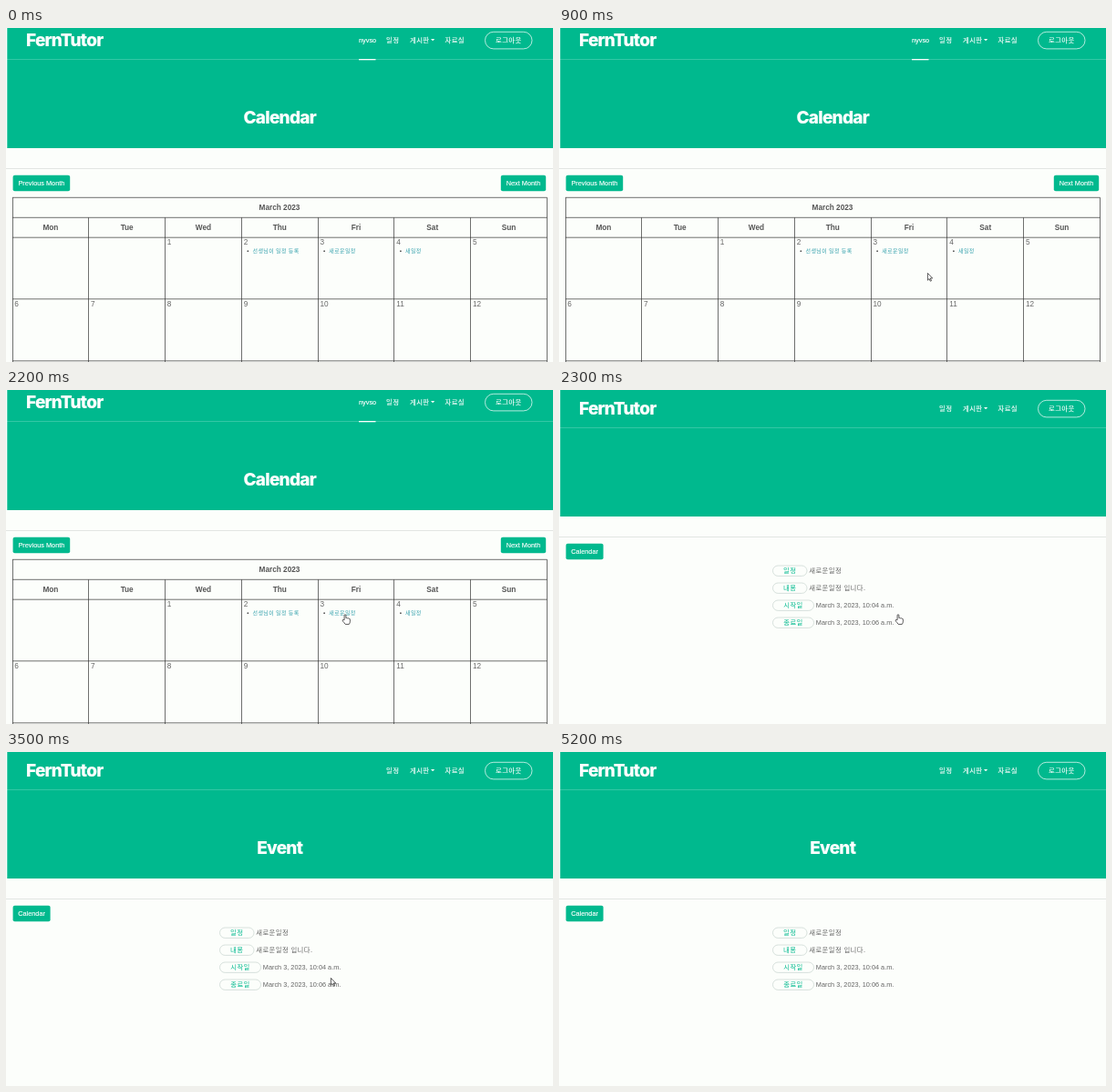
Write an HTML page that moves like this. It is 600 px wide and 367 px high and loops after 6 s.

```html
<!DOCTYPE html>
<html lang="ko">
<head>
<meta charset="utf-8">
<title>Class calendar</title>
<style>
  html, body { margin: 0; width: 100%; height: 100%; overflow: hidden; background: #fcfefb; }
  svg { display: block; width: 600px; height: 367px; }
  text { font: 7.33px "Liberation Sans", "Noto Sans CJK KR", "Noto Sans CJK", sans-serif; fill: #666; }
  .ko { font: 7.4px "Noto Sans CJK KR", "Noto Sans CJK", sans-serif; letter-spacing: .35px; }
  .link { font: 6px "Noto Sans CJK KR", "Noto Sans CJK", sans-serif; letter-spacing: .35px; fill: #38a3ae; }
  .white { fill: #fff; stroke: #fff; stroke-width: .15; }
  .big { font: 800 19px Inter, sans-serif; letter-spacing: -.75px; }
  .head { font-size: 8.25px; font-weight: 700; fill: #555; text-anchor: middle; }
  .day { font-size: 8.25px; }
  .green { fill: #00b98e; }
  .mid { text-anchor: middle; }
</style>
</head>
<body>
<svg id="stage" viewBox="0 0 600 367"></svg>
<script>
const GREEN = '#00b98e', LOOP = 6000, SWITCH = 2300, ZOOM = 1000;

const text = (x, y, s, cls = '') => `<text x="${x}" y="${y}" class="${cls}">${s}</text>`;
const rect = (x, y, w, h, fill, extra = '') =>
  `<rect x="${x}" y="${y}" width="${w}" height="${h}" fill="${fill}" ${extra}/>`;
const line = (x1, y1, x2, y2, stroke, width = 1) =>
  `<path d="M${x1} ${y1}L${x2} ${y2}" stroke="${stroke}" stroke-width="${width}"/>`;
const button = (x, y, w, label) =>
  rect(x, y, w, 17.5, GREEN, 'rx="2"') + text(x + w / 2, y + 11.3, label, 'white mid');

function header() {
  return rect(1.3, 0, 598.7, 139, GREEN) +
    line(1, 41.5, 600, 41.5, 'rgba(255,255,255,.2)') +
    line(0, 161.5, 600, 161.5, '#e2e6e3') +
    text(22, 26.8, 'FernTutor', 'big white') +
    text(417, 22.7, '일정', 'ko white') +
    text(443, 22.7, '게시판', 'ko white') +
    '<path d="M466 19h4.2l-2.1 2.2z" fill="#fff"/>' +
    text(481.5, 22.7, '자료실', 'ko white') +
    rect(525.5, 11.3, 51.5, 18.6, 'none', 'rx="9.3" stroke="#fff" stroke-width=".7"') +
    text(551.3, 22.7, '로그아웃', 'ko white mid');
}

function calendarTable() {
  const left = 7, step = 83.78, right = 593.5, ink = '#333', thin = .7;
  const col = i => left + i * step;
  let s = text(300, 200, 'March 2023', 'head');
  for (const y of [186.3, 208.3, 230.2, 297.8, 365.8]) s += line(left, y, right, y, ink, thin);
  for (let i = 0; i < 8; i++) {
    const x = Math.floor(col(i)) + .5;
    s += line(x, i % 7 ? 208.3 : 186.3, x, 367, ink, thin);
  }
  ['Mon', 'Tue', 'Wed', 'Thu', 'Fri', 'Sat', 'Sun'].forEach((d, i) =>
    s += text(col(i) + step / 2, 221.8, d, 'head'));
  for (let d = 1; d <= 12; d++) {
    const cell = d + 1;
    s += text(col(cell % 7) + 2.3, cell < 7 ? 238.4 : 305.9, d, 'day');
  }
  ['선생님이 일정 등록', '새로운일정', '새일정'].forEach((t, i) => {
    const x = col(3 + i);
    s += `<circle cx="${x + 7}" cy="245.2" r=".9" fill="#555"/>` + text(x + 12.2, 247.2, t, 'link');
  });
  return s;
}

function eventDetails() {
  const rows = [
    ['일정', '새로운일정', 37.5, 'ko'],
    ['내용', '새로운일정 입니다.', 37.5, 'ko'],
    ['시작일', 'March 3, 2023, 10:04 a.m.', 45, ''],
    ['종료일', 'March 3, 2023, 10:06 a.m.', 45, '']
  ];
  return rows.map(([label, value, w, cls], i) => {
    const y = 198.7 + 19 * i;
    return rect(234.5, y - 5.7, w, 11.4, 'none', 'rx="5.7" stroke="#cfdad5" stroke-width=".8"') +
      text(234.5 + w / 2, y + 2.7, label, 'ko green mid') +
      text(236.8 + w, y + 2.7, value, cls);
  }).join('');
}

const stage = document.getElementById('stage');
stage.innerHTML =
  `<g id="calendar">
    <g transform="translate(0 -7)">${header()}
      ${text(387, 22.6, 'nyvso', 'white')}${rect(387, 41, 18.5, 1.3, '#fff')}
      ${text(300.2, 111.8, 'Calendar', 'big white mid')}
      ${button(7.6, 168.8, 62.6, 'Previous Month')}${button(542.8, 168.8, 49.4, 'Next Month')}
    </g>${calendarTable()}
  </g>
  <g id="event">${header()}${button(7.6, 168.8, 41, 'Calendar')}${eventDetails()}
    <g id="title">${text(0, 6.8, 'Event', 'big white mid')}</g>
  </g>
  <g id="cursor" fill="#fff" stroke="#333" stroke-width=".8" stroke-linejoin="round">
    <path id="arrow" d="M.4.4V8.2L2.1 6.5 3.3 9.2 4.5 8.7 3.3 6H5.7Z"/>
    <path id="hand" d="M-.9 5.6V.8Q-.9-.3 0-.3T.9.8V3.6Q1.9 2.9 2.6 3.9 3.6 3.3 4.1 4.3 5.4 3.9 5.4 5.2V7.2Q5.4 9 4.3 10.4H.2Q-.9 8.7-2.5 7.1-3.3 5.9-2.4 5.4-1.7 5-.9 5.9Z"/>
  </g>`;
const [calendar, event, title, cursor, arrow, hand] =
  ['calendar', 'event', 'title', 'cursor', 'arrow', 'hand'].map(id => document.getElementById(id));

// Pointer track: time, x, y
const track = [
  [300, 470, 366], [700, 424, 298], [900, 404, 269], [1400, 375, 249], [1600, 372, 247],
  [2800, 372, 247], [3000, 355, 250], [3500, 356, 248], [3700, 356, 248], [3900, 359, 247],
  [4200, 359, 247], [4300, 399, 227], [4400, 399, 227], [4500, 393, 186], [4700, 393, 186],
  [4800, 386, 179], [4900, 386, 179], [5000, 19, 144], [5200, 19, 144]
];

function pointAt(t) {
  const i = track.findIndex(p => p[0] > t);
  if (i < 1) return null;
  const [t0, x0, y0] = track[i - 1], [t1, x1, y1] = track[i];
  const k = (t - t0) / (t1 - t0);
  return [x0 + (x1 - x0) * k, y0 + (y1 - y0) * k];
}

// CSS "ease" curve, solved by bisection
function ease(x) {
  if (x <= 0 || x >= 1) return x <= 0 ? 0 : 1;
  const bez = (u, a, b) => 3 * u * (1 - u) ** 2 * a + 3 * u * u * (1 - u) * b + u ** 3;
  let lo = 0, hi = 1;
  for (let i = 0; i < 20; i++) {
    const u = (lo + hi) / 2;
    if (bez(u, .25, .25) < x) lo = u; else hi = u;
  }
  return bez(lo, .1, 1);
}

const show = (el, on) => el.style.display = on ? '' : 'none';

function draw(now) {
  const t = Math.floor(now % LOOP / 100) * 100;
  const onEvent = t >= SWITCH;
  show(calendar, !onEvent);
  show(event, onEvent);

  const k = (t - SWITCH) / ZOOM;
  title.setAttribute('transform', `translate(300.2 105) scale(${.3 + .7 * ease(k)})`);
  title.setAttribute('opacity', ease(k * 2));

  const p = pointAt(t);
  show(cursor, p);
  if (p) cursor.setAttribute('transform', `translate(${p[0]} ${p[1]})`);
  const overLink = t >= 1400 && t < 2900;
  show(hand, overLink);
  show(arrow, !overLink);
}

const start = performance.now();
function tick() {
  draw(performance.now() - start);
  requestAnimationFrame(tick);
}
tick();
</script>
</body>
</html>
```
